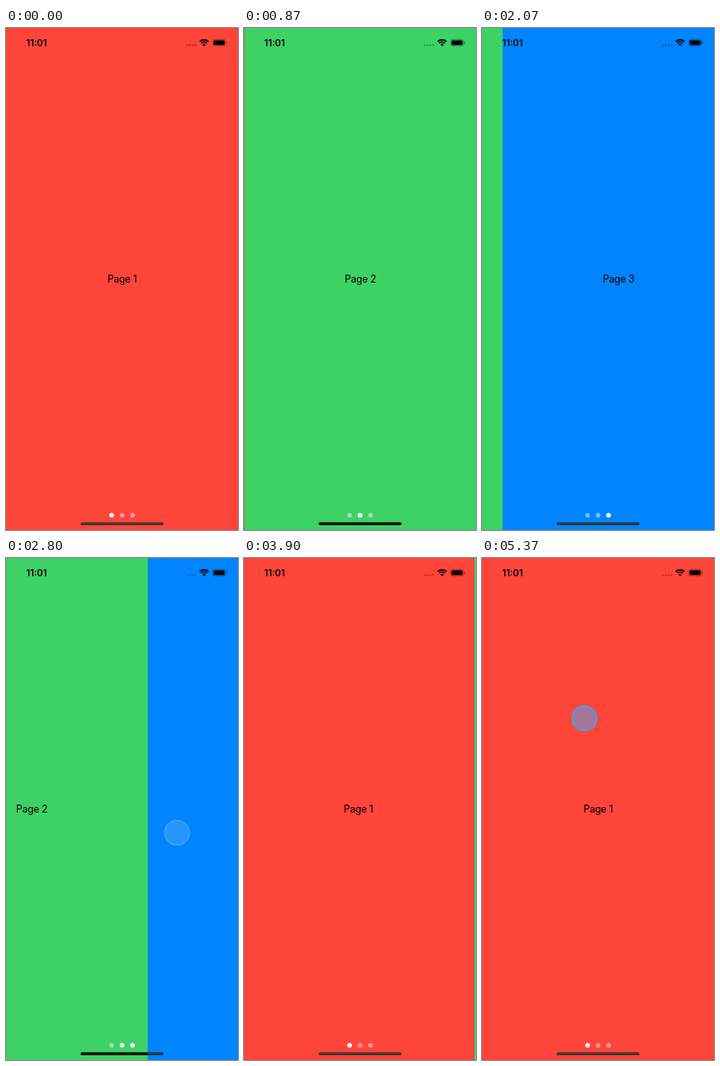
An HTML page with a canvas for the animation above (5400 ms loop, 293 px wide and 633 px high).

```html
<!DOCTYPE html>
<html lang="en">
<head>
<meta charset="utf-8">
<title>Paged swipe</title>
<style>
html, body { margin: 0; width: 100%; height: 100%; overflow: hidden; }
canvas { display: block; width: 293px; height: 633px; }
</style>
</head>
<body>
<canvas id="stage"></canvas>
<script>
const W = 293, H = 633, LOOP = 5400;
const canvas = document.getElementById('stage');
const ratio = window.devicePixelRatio || 1;
canvas.width = Math.round(W * ratio);
canvas.height = Math.round(H * ratio);
const ctx = canvas.getContext('2d');
ctx.scale(ratio, ratio);

const pages = [
  { color: '#ff4539', bar: '#43363a' },
  { color: '#3ed165', bar: '#0c120e' },
  { color: '#0085ff', bar: '#30363f' }
];

// Horizontal swipes: finger start, travel, ease-out power, page before and after.
const swipes = [
  { start: 70, lift: 521, x: 232, y: 327, dx: -193.5, power: 2, from: 0, to: 1 },
  { start: 1370, lift: 1945, x: 202, y: 337, dx: -183, power: 2.28, from: 1, to: 2 },
  { start: 2570, lift: 2950, x: 37, y: 346.5, dx: 212, power: 2, from: 2, to: 1 },
  { start: 3370, lift: 3617, x: 112, y: 337, dx: 136, power: 1.5, from: 1, to: 0 }
];

const clamp = v => Math.min(1, Math.max(0, v));
const span = (t, a, b) => clamp((t - a) / (b - a));
const easeOut = (u, power) => 1 - (1 - u) ** power;
const travel = (s, t) => s.dx * easeOut(span(t, s.start, s.lift), s.power);

function scrollAt(t) {
  const s = swipes.filter(s => t >= s.start).pop();
  if (!s) return 0;
  const dragged = s.from * W - travel(s, t);
  if (t < s.lift) return dragged;
  const k = (t - s.lift) / 45; // critically damped settle
  return s.to * W + (dragged - s.to * W) * (1 + k) * Math.exp(-k);
}

function touchAt(t) {
  const s = swipes.find(s => t >= s.start && t < s.lift);
  if (s) return [s.x + travel(s, t), s.y];
  if (t < 4170) return null;
  const down = easeOut(span(t, 4170, 4735), 2);
  const up = (1 - Math.cos(Math.PI * span(t, 4850, 5380))) / 2;
  return [129.3, 227 + 208.5 * down - 233.5 * up];
}

function circle(x, y, r) {
  ctx.beginPath();
  ctx.arc(x, y, r, 0, Math.PI * 2);
}

function box(x, y, w, h, r) {
  ctx.beginPath();
  ctx.roundRect(x, y, w, h, r);
}

function text(str, x, y, font, align, spacing) {
  ctx.font = font + ' Inter, Roboto, sans-serif';
  ctx.textAlign = align;
  ctx.letterSpacing = spacing;
  ctx.fillStyle = '#000';
  ctx.fillText(str, x, y);
}

function drawPages(scroll) {
  pages.forEach((page, i) => {
    const x = i * W - scroll;
    if (Math.abs(x) >= W) return;
    ctx.save();
    ctx.beginPath();
    ctx.rect(x, 0, W + 1, H);
    ctx.clip();
    ctx.fillStyle = page.color;
    ctx.fillRect(x, 0, W + 1, H);
    text('Page ' + (i + 1), x + 146.7, 321.4, '12.5px', 'center', '-0.25px');
    ctx.fillStyle = page.bar;
    box(94.3, 623.3, 104.6, 3.8, 1.9);
    ctx.fill();
    ctx.restore();
  });
}

function drawStatus() {
  text('11:01', 25.6, 22.7, '600 11.6px', 'left', '0px');

  ctx.fillStyle = 'rgba(0,0,0,.3)';
  for (let i = 0; i < 4; i++) {
    circle(228.3 + i * 3.6, 21.6, 1.2);
    ctx.fill();
  }

  // Wi-Fi: two arcs over a wedge
  const cx = 250.2, cy = 22.9, mid = -Math.PI / 2, half = 0.76;
  ctx.strokeStyle = ctx.fillStyle = '#000';
  ctx.lineWidth = 1.7;
  for (const r of [5.2, 8.1]) {
    ctx.beginPath();
    ctx.arc(cx, cy, r, mid - half, mid + half);
    ctx.stroke();
  }
  ctx.beginPath();
  ctx.moveTo(cx, cy);
  ctx.arc(cx, cy, 3, mid - half, mid + half);
  ctx.fill();

  // Battery
  ctx.lineWidth = 0.8;
  ctx.strokeStyle = 'rgba(0,0,0,.4)';
  box(260.8, 14.3, 16.6, 8.4, 2.6);
  ctx.stroke();
  box(262, 15.5, 14.2, 6, 1.5);
  ctx.fill();
  ctx.fillStyle = 'rgba(0,0,0,.4)';
  box(278.2, 17.1, 1, 2.8, 0.5);
  ctx.fill();
}

function drawDots(t) {
  // Share of the last moments that each page was the current one
  const share = [0, 0, 0], samples = 16;
  for (let i = 0; i < samples; i++) {
    share[Math.round(scrollAt(t - i * 11) / W)] += 1 / samples;
  }
  share.forEach((part, i) => {
    ctx.fillStyle = `rgba(255,255,255,${0.45 + 0.55 * clamp(part * 2)})`;
    circle(133.4 + i * 13.2, 614.4, 2.95);
    ctx.fill();
  });
}

function drawTouch(t) {
  const touch = touchAt(t);
  if (!touch) return;
  circle(...touch, 15.4);
  ctx.fillStyle = 'rgba(72,168,250,.5)';
  ctx.fill();
  ctx.lineWidth = 2.2;
  ctx.strokeStyle = 'rgba(62,163,245,.88)';
  ctx.stroke();
}

function frame(now) {
  const t = now % LOOP;
  drawPages(scrollAt(t));
  drawStatus();
  drawDots(t);
  drawTouch(t);
}

let origin;
function tick(now) {
  origin ??= now;
  frame(now - origin);
  requestAnimationFrame(tick);
}
requestAnimationFrame(tick);
</script>
</body>
</html>
```
